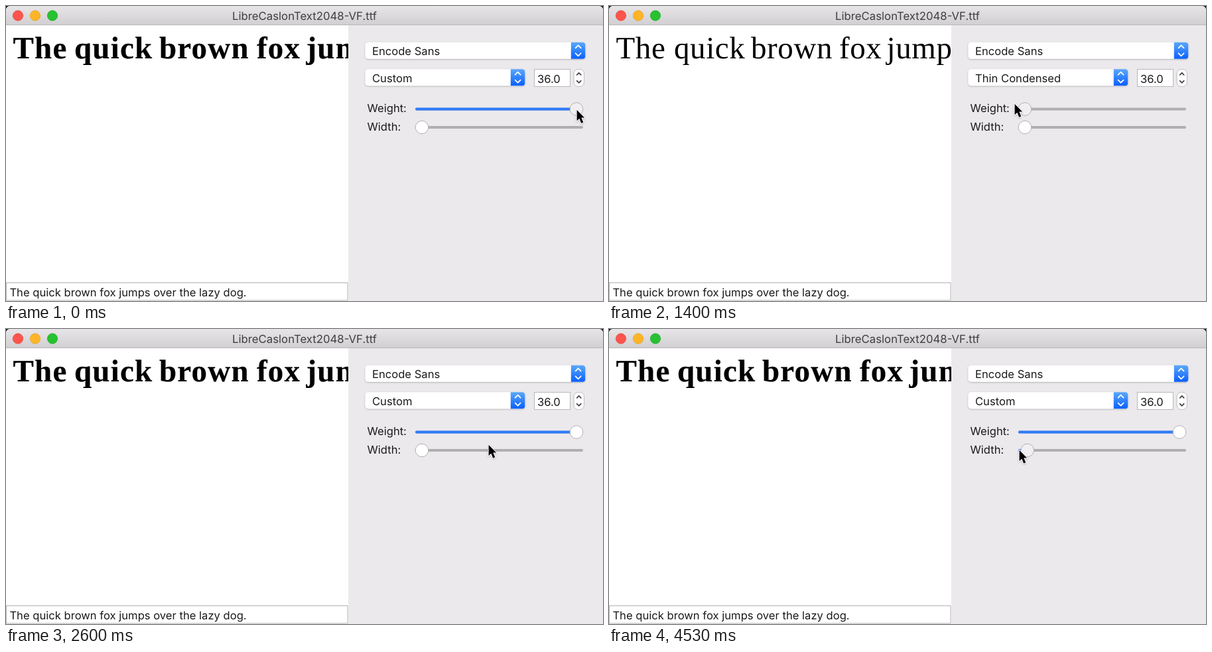
These frames come from a looping animation (900 px wide and 445 px high, 4590 ms). An HTML page:

```html
<!DOCTYPE html>
<html lang="en">
<head>
<meta charset="utf-8">
<title>Variable font preview</title>
<style>
  html, body { margin: 0; width: 100%; height: 100%; overflow: hidden; background: #1c1c1e; }
  svg { display: block; width: 900px; height: 445px; }
  text { font: 16.6px Inter, "Open Sans", sans-serif; fill: #1b1a1c; white-space: pre; text-rendering: geometricPrecision; }
  #title { font-size: 16.75px; fill: #3f3e40; text-anchor: middle; }
  #words text { font: 47px "Liberation Serif", serif; fill: #000; stroke: #000; stroke-linejoin: round; }
  .chevron { fill: none; stroke-width: 1.8; stroke-linecap: round; stroke-linejoin: round; }
  .track { stroke: #b0aeb1; stroke-width: 4; stroke-linecap: round; }
  .fill { stroke: #2f7bfd; stroke-width: 4; stroke-linecap: round; }
  .knob { fill: #fff; stroke: #b3b1b4; stroke-width: 1; }
  .knob.pressed { fill: #f1eff2; }
</style>
</head>
<body>
<svg viewBox="0 0 900 445">
  <defs>
    <linearGradient id="bar" x2="0" y2="1">
      <stop stop-color="#e7e5e7"/><stop offset="1" stop-color="#d1cfd1"/>
    </linearGradient>
    <linearGradient id="blue" x2="0" y2="1">
      <stop stop-color="#5ba8fa"/><stop offset="1" stop-color="#0a60fe"/>
    </linearGradient>
    <clipPath id="window"><path d="M0 445V7Q0 0 7 0H893Q900 0 900 7V445Z"/></clipPath>
    <filter id="soft" x="-50%" y="-50%" width="200%" height="200%">
      <feDropShadow dx="0" dy=".8" stdDeviation=".8" flood-opacity=".3"/>
    </filter>
    <path id="arrows" class="chevron" d="M-4-4 0-8 4-4M-4 4 0 8 4 4"/>
  </defs>

  <g clip-path="url(#window)">
    <rect width="900" height="445" fill="#fff"/>
    <g id="words"></g>
    <rect x="516" y="28" width="384" height="417" fill="#ebe9ec"/>
    <rect width="900" height="28" fill="url(#bar)"/>
    <rect y="28" width="900" height="1" fill="#b9b7b9"/>
    <circle cx="18" cy="14.5" r="7.7" fill="#fd544d" stroke="#e2463f" stroke-width=".7"/>
    <circle cx="44" cy="14.5" r="7.7" fill="#fdb527" stroke="#e0a023" stroke-width=".7"/>
    <circle cx="70" cy="14.5" r="7.7" fill="#28c131" stroke="#1dac29" stroke-width=".7"/>
    <text id="title" x="450" y="20.5">LibreCaslonText2048-VF.ttf</text>

    <rect x=".5" y="417.5" width="514.5" height="26.5" fill="#fff" stroke="#b4b2b4"/>
    <text x="5.4" y="438.2">The quick brown fox jumps over the lazy dog.</text>

    <g id="menus"></g>
    <text x="552" y="74">Encode Sans</text>
    <text id="preset" x="552" y="114.5"></text>

    <rect x="796.5" y="95.5" width="54" height="26" fill="#fff" stroke="#b9b7ba"/>
    <text x="801" y="115.5">36.0</text>
    <rect x="856" y="95.5" width="15.5" height="26" rx="6.5" fill="#fff" stroke="#bfbdc0"/>
    <path class="chevron" stroke="#454346" d="M860.7 103.8 863.7 100.8 866.7 103.8M860.7 112.8 863.7 115.8 866.7 112.8"/>

    <text x="544.5" y="160">Weight:</text>
    <text x="544.5" y="187.5">Width:</text>
    <g id="sliders"></g>
  </g>
  <path id="cursor" d="M.6 .8V17.2L4.3 13.8 7.2 20.7 10.3 19.4 7.4 12.6H12.2Z"
        fill="#000" stroke="#fff" stroke-width="2" stroke-linejoin="round" paint-order="stroke" filter="url(#soft)"/>
</svg>
<script>
const LOOP = 4590, STEP = 200 / 3, LAG = 40;
const MIN = 627, MAX = 860;
const WEIGHT_UP = 2330, WIDTH_DOWN = 3000;

// Pointer path: time, x, y
const PATH = [
  [0, 860, 156], [130, 858, 156], [670, 771, 152], [1400, 611, 147],
  [1880, 788, 151], [2000, 806, 152], [2130, 826, 153], [2270, 884, 156],
  [2600, 727, 174], [2900, 624, 180], [3050, 627, 181],
  [3600, 857, 189], [3760, 874, 188], [4530, 618, 182]
];

// Sample words: text, x at the lightest weight, shift at the heaviest
const WORDS = [
  ["The", 10.5, 0], ["quick", 98, 5], ["brown", 214, 17],
  ["fox", 347, 31], ["jumps", 418.5, 34]
];

const $ = id => document.getElementById(id);
const clamp = (v, lo, hi) => Math.min(hi, Math.max(lo, v));

function add(parent, tag, attrs, text = "") {
  const el = document.createElementNS("http://www.w3.org/2000/svg", tag);
  for (const key in attrs) el.setAttribute(key, attrs[key]);
  el.textContent = text;
  return parent.appendChild(el);
}

function menu(y, right) {
  const box = { x: 541.5, y, width: right - 541.5, height: 25, rx: 4.5 };
  add($("menus"), "rect", { ...box, fill: "#fff", filter: "url(#soft)" });
  add($("menus"), "path", {
    d: `M${right - 21.5} ${y}h17q4.5 0 4.5 4.5v16q0 4.5-4.5 4.5h-17z`, fill: "url(#blue)"
  });
  add($("menus"), "use", { href: "#arrows", x: right - 10.7, y: y + 12.5, stroke: "#fff" });
}

function slider(y) {
  const root = $("sliders");
  add(root, "path", { class: "track", d: `M619 ${y}H868` });
  const fill = add(root, "path", { class: "fill" });
  const knob = add(root, "circle", { class: "knob", cy: y, r: 9.8 });
  return (value, pressed) => {
    const x = MIN + value * (MAX - MIN);
    fill.setAttribute("d", value > 0 ? `M619 ${y}H${x}` : "");
    knob.setAttribute("cx", x);
    knob.classList.toggle("pressed", pressed);
  };
}

// Monotone cubic through the path points
function slope(i, axis) {
  const secant = k => (PATH[k + 1][axis] - PATH[k][axis]) / (PATH[k + 1][0] - PATH[k][0]);
  if (i === 0) return secant(0);
  if (i === PATH.length - 1) return secant(i - 1);
  const a = secant(i - 1), b = secant(i);
  return a * b > 0 ? 2 * a * b / (a + b) : 0;
}

function pointer(t, axis) {
  t = clamp(t, 0, PATH[PATH.length - 1][0]);
  let i = 0;
  while (i < PATH.length - 2 && t > PATH[i + 1][0]) i++;
  const p = PATH[i], q = PATH[i + 1], span = q[0] - p[0], u = (t - p[0]) / span, v = 1 - u;
  return p[axis] * v * v * (1 + 2 * u) + q[axis] * u * u * (3 - 2 * u)
    + span * u * v * (slope(i, axis) * v - slope(i + 1, axis) * u);
}

const dragged = t => (clamp(pointer(t - LAG, 1), MIN, MAX) - MIN) / (MAX - MIN);

menu(54.8, 873.3);
menu(95.2, 782.3);
const setWeight = slider(155.5), setWidth = slider(183);
const words = WORDS.map(([text]) => add($("words"), "text", { y: 79 }, text));

function setWords(weight) {
  const bold = weight > .5;
  words.forEach((el, i) => {
    el.setAttribute("x", WORDS[i][1] + WORDS[i][2] * weight);
    el.style.fontWeight = bold ? 700 : 400;
    el.style.strokeWidth = bold ? .4 * weight - .2 : 2 * weight;
    el.style.letterSpacing = (bold ? 2 * weight - .8 : .6 + 2.4 * weight) + "px";
  });
}

function draw(now) {
  const t = Math.floor((now % LOOP + 5) / STEP) * STEP;
  const weight = t < WEIGHT_UP ? dragged(t) : 1;
  const width = t < WIDTH_DOWN ? 0 : dragged(t);
  setWeight(weight, t < WEIGHT_UP);
  setWidth(width, t >= WIDTH_DOWN);
  setWords(weight);
  $("preset").textContent = weight || width ? "Custom" : "Thin Condensed";
  $("cursor").setAttribute("transform", `translate(${pointer(t, 1)} ${pointer(t, 2)})`);
}

const start = performance.now();
function tick() {
  draw(performance.now() - start);
  requestAnimationFrame(tick);
}
tick();
</script>
</body>
</html>
```
